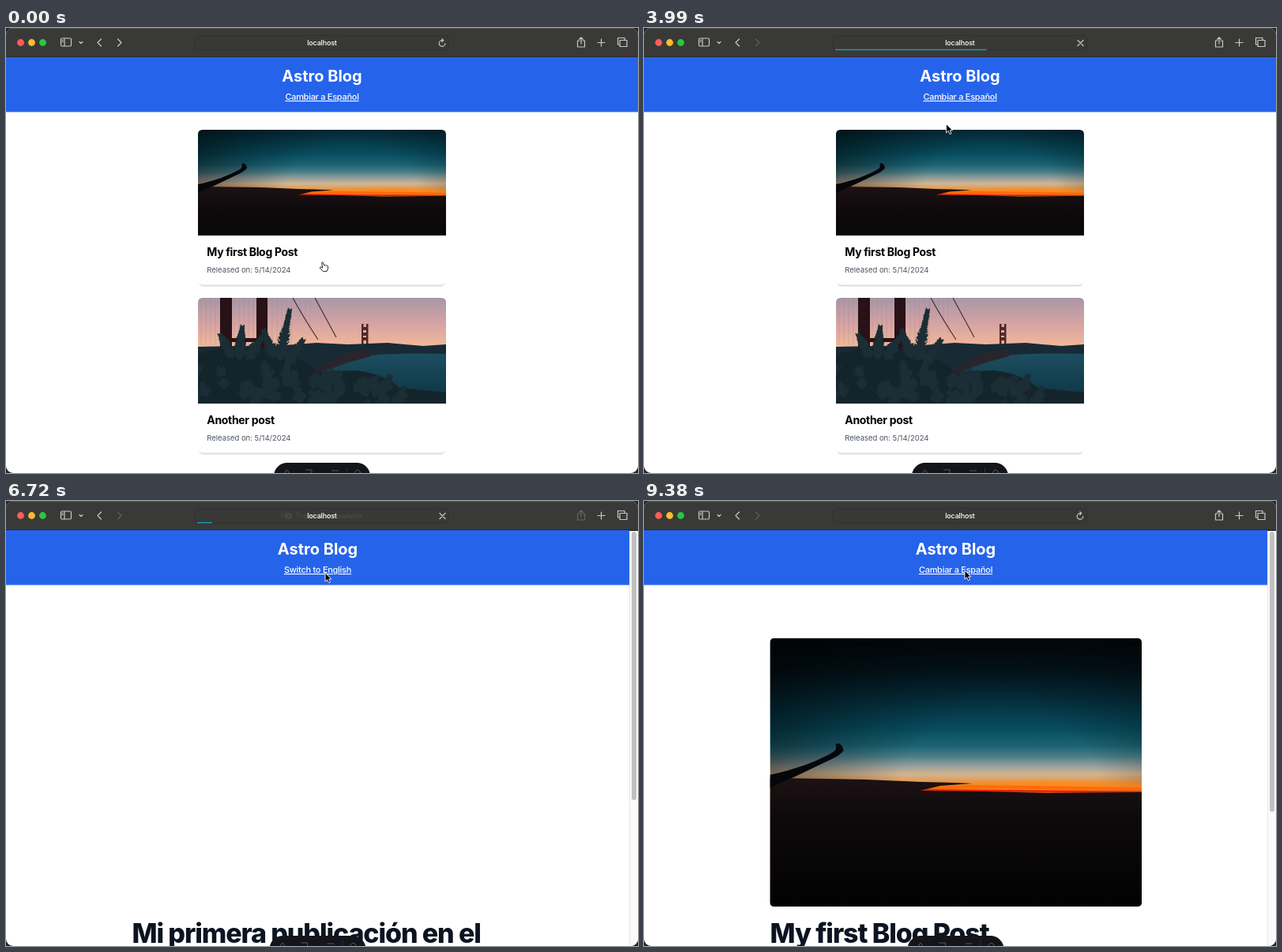
Recreate the animation shown at these times as an HTML page. Size 800 px wide and 564 px high, loop 9450 ms.

```html
<!DOCTYPE html>
<html lang="en">
<head>
<meta charset="utf-8">
<title>Astro Blog</title>
<style>
html, body { margin: 0; width: 100%; height: 100%; overflow: hidden; background: #242424; }
svg { display: block; width: 100vw; height: 100vh; font-family: Inter, "Open Sans", sans-serif; }
.icon { fill: none; stroke: #c9c9c7; stroke-width: 1.2; stroke-linecap: round; stroke-linejoin: round; }
.bar { font-size: 9px; font-weight: 500; letter-spacing: -.18px; fill: #fff; }
.site { font-size: 20px; font-weight: 700; fill: #fff; text-anchor: middle; }
.link { font-size: 11px; font-weight: 500; letter-spacing: -.28px; fill: #fff; text-anchor: middle; text-decoration: underline; }
.head { font-size: 14px; font-weight: 700; letter-spacing: -.33px; fill: #000; }
.date { font-size: 9.5px; letter-spacing: -.02px; fill: #4b5563; }
.title { font-size: 34px; font-weight: 800; letter-spacing: -1.1px; fill: #0b1420; }
</style>
</head>
<body>
<svg viewBox="0 0 800 564">
<defs>
  <linearGradient id="sky" x1="0" y1="0" x2="0" y2="200" gradientUnits="userSpaceOnUse">
    <stop offset="0" stop-color="#01080d"/><stop offset=".2" stop-color="#03151e"/>
    <stop offset=".4" stop-color="#053241"/><stop offset=".58" stop-color="#084e60"/>
    <stop offset=".68" stop-color="#1b6373"/><stop offset=".75" stop-color="#4c7f89"/>
    <stop offset=".81" stop-color="#98a09b"/><stop offset=".86" stop-color="#d0b592"/>
    <stop offset=".91" stop-color="#e39a50"/><stop offset="1" stop-color="#c9560f"/>
  </linearGradient>
  <radialGradient id="glow">
    <stop offset="0" stop-color="#ff8c1a"/><stop offset=".5" stop-color="#ff8a1c" stop-opacity=".7"/>
    <stop offset="1" stop-color="#ff8a1c" stop-opacity="0"/>
  </radialGradient>
  <radialGradient id="vignette" cx=".62" cy=".55" r=".75">
    <stop offset=".35" stop-opacity="0"/><stop offset="1" stop-opacity=".6"/>
  </radialGradient>
  <linearGradient id="ground" x1="0" y1="0" x2="0" y2="1">
    <stop offset="0" stop-color="#1d1113"/><stop offset=".3" stop-color="#0d0a0c"/><stop offset="1" stop-color="#020202"/>
  </linearGradient>
  <linearGradient id="dusk" x1="0" y1="0" x2="0" y2="1">
    <stop offset="0" stop-color="#a897a6"/><stop offset=".5" stop-color="#d3a3a3"/><stop offset="1" stop-color="#f3b899"/>
  </linearGradient>
  <linearGradient id="bay" x1="0" y1="0" x2="0" y2="1">
    <stop offset="0" stop-color="#1d4e60"/><stop offset="1" stop-color="#0b3342"/>
  </linearGradient>
  <g id="sunset">
    <rect width="470" height="340" fill="url(#sky)"/>
    <rect width="470" height="340" fill="url(#vignette)"/>
    <ellipse cx="350" cy="190" rx="230" ry="13" fill="url(#glow)"/>
    <path d="M185 191L250 188L470 191" fill="none" stroke="#ff6a08" stroke-width="4"/>
    <path d="M182 192.500L300 193.500L470 195" fill="none" stroke="#e6280a" stroke-width="3"/>
    <path d="M0 177L120 179L190 182Q235 183 256 184L215 187L190 193L270 194L350 196L470 195V340H0Z" fill="url(#ground)"/>
    <path d="M0 173C30 167 62 155 80 144Q85 141 83 134Q90 131 93 142Q89 148 78 153L28 177Q15 182 0 190Z" fill="#05070a"/>
  </g>
  <g id="bridge">
    <rect width="314" height="62" fill="url(#dusk)"/>
    <path id="wires" fill="none" stroke="#9a7f90" stroke-width=".5" opacity=".55"/>
    <path d="M120 0Q133 24 152 53M148 0L175 50" fill="none" stroke="#3b2932" stroke-width="1.100"/>
    <path d="M207 33h2.500v4h3.500v-4h2.500v28h-2.500v-7h-3.500v7H207ZM209 41h4v3h-4ZM209 48h4v2h-4Z" fill="#51272d" fill-rule="evenodd"/>
    <path d="M0 62L110 60L150 57L190 59L240 57L285 61L314 59V134H0Z" fill="#172a35"/>
    <path d="M165 82Q215 68 314 71V134H120Z" fill="url(#bay)"/>
    <path d="M125 101L192 68L218 65L219 74L190 82L140 100Z" fill="#29252d"/>
    <path d="M28 0H43V78H28ZM74 0H88V78H74ZM40 51H78V56H40Z" fill="#281217"/>
    <path d="M0 72Q40 58 88 66T150 94L200 92Q235 96 255 114L314 120V134H0Z" fill="#14242b"/>
    <path id="leaves" fill="none" stroke="#1b2d35" stroke-width="1.300" stroke-linecap="round"/>
  </g>
  <clipPath id="window"><rect width="800" height="564" rx="9"/></clipPath>
  <clipPath id="cardTop"><path d="M0 134V6Q0 0 6 0H308Q314 0 314 6V134Z"/></clipPath>
  <clipPath id="hero"><rect width="470.500" height="340" rx="5"/></clipPath>
  <g id="card">
    <rect x="1" y="5" width="312" height="193.500" rx="6" fill="#dedede"/>
    <rect y="0" width="314" height="196.500" rx="6" fill="#fff"/>
  </g>
</defs>

<g clip-path="url(#window)">
  <rect width="800" height="564" fill="#fff"/>
  <rect width="800" height="38" fill="#393937"/>
  <path d="M0 .5H800" stroke="#555553"/>
  <path d="M0 36.500H800" stroke="#2a2a29"/>
  <circle cx="18.500" cy="18.500" r="4.400" fill="#ff5f57"/>
  <circle cx="32.500" cy="18.500" r="4.400" fill="#febc2e"/>
  <circle cx="46.500" cy="18.500" r="4.400" fill="#28c840"/>
  <g class="icon">
    <path d="M71 13H81Q82.500 13 82.500 14.500V21.500Q82.500 23 81 23H71Q69.500 23 69.500 21.500V14.500Q69.500 13 71 13ZM74 13V23M71 15.500h1.300M71 17.500h1.300"/>
    <path d="M93 17.500L95 19.500L97 17.500M120.500 14L116 18.500L120.500 23"/>
    <path id="forward" d="M141.500 14L146 18.500L141.500 23"/>
    <path id="share" d="M726 16H723.500V24H732.500V16H730M728 20V12M725.500 14.300L728 11.800L730.500 14.300"/>
    <path d="M749 18.500H758M753.500 14V23"/>
    <path d="M776.500 21H774.500V12.500H783V15M777 15.500H786V23.500H777Z"/>
  </g>
  <rect x="239.500" y="9.500" width="321" height="18.500" rx="5" fill="#383836" stroke="#30302e"/>
  <text id="host" class="bar" x="400" y="22" text-anchor="middle">localhost</text>
  <g id="translate">
    <rect x="348.500" y="13.500" width="7" height="7" rx="3" class="icon"/>
    <rect x="353.500" y="15.500" width="8" height="7" rx="2.500" fill="#eee"/>
    <text x="350.300" y="19" font-size="5" fill="#eee">A</text>
    <path d="M355.500 18H359.500M357.500 17V18M356 21.200L359 18M356 18L359 21.200" fill="none" stroke="#393937" stroke-width=".8"/>
    <text class="bar" x="366" y="22">Translation Available</text>
  </g>
  <path id="reload" class="icon" d="M555.800 19.500A3.800 3.800 0 1 1 552 15.700H553.500M551.800 13.700L553.800 15.700L551.800 17.700"/>
  <path id="stop" class="icon" d="M549 15.500L556 22.500M556 15.500L549 22.500"/>
  <rect id="progress" x="242" y="26.800" height="1.400" fill="#1a9fc0"/>

  <rect id="banner" y="37" height="69.500" fill="#2563eb"/>
  <g id="heading">
    <text class="site" y="68">Astro Blog</text>
    <text id="switch" class="link" y="91"></text>
  </g>

  <g id="home">
    <g transform="translate(243 129)">
      <use href="#card"/>
      <g clip-path="url(#cardTop)"><use href="#sunset" transform="translate(0 -46.500) scale(.668)"/></g>
      <text id="head1" class="head" x="11.300" y="160"></text>
      <text class="date" x="11.300" y="181"></text>
    </g>
    <g transform="translate(243 342)">
      <use href="#card"/>
      <g clip-path="url(#cardTop)"><use href="#bridge"/></g>
      <text id="head2" class="head" x="11.300" y="160"></text>
      <text class="date" x="11.300" y="181"></text>
    </g>
  </g>

  <g id="post">
    <g id="photo" transform="translate(159.500 174)" clip-path="url(#hero)"><use href="#sunset" transform="scale(1.002 1)"/></g>
    <text id="title" class="title" x="159.500" y="560"></text>
    <rect x="789" y="38" width="11" height="526" fill="#fafafa"/>
    <path d="M789.500 38V564" stroke="#e8e8e8"/>
    <rect id="thumb" x="792" y="39" width="6" rx="3" fill="#c1c1c1"/>
  </g>

  <g id="dock">
    <rect x="-61" y="551" width="122" height="36" rx="17" fill="#13151a"/>
    <path d="M-47 564Q-44.500 556-42 564M-21 560h8v4M12 561h9M41 564Q45 556 49 564" fill="none" stroke="#55575d"/>
    <path d="M31.500 557V564" stroke="#2c2f36"/>
  </g>
</g>
<g id="cursor" stroke-linejoin="round">
  <path id="arrow" d="M0 0V11L2.600 8.700L4.500 12.700L6.500 11.800L4.700 7.900H8Z" fill="#000" stroke="#fff" stroke-width=".9"/>
  <path id="hand" transform="scale(.95)" d="M.8 1.300Q1.800 .3 2.700 1.400L3.700 5Q5 4.200 5.700 5.200Q7 4.600 7.600 5.800Q9 5.400 9.200 7L8.800 10L7.500 13H2.500L-1.700 8.700Q-2 7.200-.2 7.300L1.600 8.500Z" fill="#fff" stroke="#000" stroke-width=".9"/>
</g>
</svg>

<script>
const $ = id => document.getElementById(id);
const clamp = v => Math.max(0, Math.min(1, v));
const ease = v => { v = clamp(v); return v * v * (3 - 2 * v); };
const show = (id, v) => $(id).setAttribute('opacity', +v);

const LOOP = 9450, STEP = 70;
const words = {
  en: { link: 'Cambiar a Español', one: 'My first Blog Post', two: 'Another post',
        date: 'Released on: 5/14/2024', title: 'My first Blog Post', thumb: 355 },
  es: { link: 'Switch to English', one: 'Mi primera publicación en el blog', two: 'Otra publicación',
        date: 'Publicado el: 5/14/2024', title: 'Mi primera publicación en el', thumb: 340 }
};
// Each visit: click, load complete, progress bar gone
const visits = [
  { at: -2000, end: -1000, gone: -900, lang: 'en', page: 'home' },
  { at: 1610, end: 2310, gone: 2520, lang: 'es', page: 'home' },
  { at: 3430, end: 4340, gone: 4410, lang: 'en', page: 'home' },
  { at: 4830, end: 5740, gone: 5880, lang: 'en', page: 'post' },
  { at: 6650, end: 7420, gone: 8120, lang: 'es', page: 'post' },
  { at: 8610, end: 9030, gone: 9380, lang: 'en', page: 'post' }
];
const path = [
  [0, 399, 296], [70, 399, 296], [350, 401, 290], [560, 401, 290], [1260, 386, 83],
  [2730, 386, 83], [2800, 387, 83], [2940, 387, 83], [3150, 387, 84], [3780, 387, 84],
  [4410, 370, 230], [4620, 319, 281], [5670, 319, 281], [5880, 370, 190], [6160, 370, 190],
  [6300, 404, 91], [7980, 404, 91], [8120, 406, 89], [8260, 406, 89], [8330, 406, 88], [LOOP, 406, 88]
];
// The pointer starts as a hand and swaps shape at these times
const swaps = [840, 1120, 1680, 2940, 3500, 4200, 4900, 6230, 6720, 8260, 8680];

function pointer(t) {
  const i = path.findIndex(p => p[0] > t);
  const [a, b] = [path[i - 1], path[i]];
  const k = ease((t - a[0]) / (b[0] - a[0]));
  return [a[1] + (b[1] - a[1]) * k, a[2] + (b[2] - a[2]) * k];
}

function drawBridge() {
  let seed = 7, wires = '', leaves = '';
  const rnd = () => (seed = seed * 16807 % 2147483647) / 2147483647;
  for (let x = 4; x < 145; x += 6) wires += `M${x} 0V${x < 120 ? 60 : 2 * (x - 120)}`;
  // A pine frond: needles fan out along a stem that points up
  const frond = (x, y, tilt, len) => {
    const dx = Math.sin(tilt), dy = -Math.cos(tilt);
    for (let s = 0; s < len; s += 1.6) {
      const reach = 3 + 7 * (1 - s / len) * (.5 + rnd());
      for (const side of [-.8, .8]) {
        const a = tilt + side;
        leaves += `M${x + dx * s} ${y + dy * s}l${reach * Math.sin(a)} ${-reach * Math.cos(a)}`;
      }
    }
  };
  for (let i = 0; i < 45; i++) {
    const x = rnd() * 255;
    frond(x, 92 + x * .1 + rnd() * 42, rnd() * 2 - 1, 12 + rnd() * 14);
  }
  frond(103, 80, .2, 66);
  frond(96, 76, -.35, 38);
  frond(112, 84, .6, 38);
  frond(52, 78, .1, 42);
  frond(44, 76, -.5, 34);
  frond(62, 78, .6, 36);
  $('wires').setAttribute('d', wires);
  $('leaves').setAttribute('d', leaves);
}

function render(t) {
  const n = visits.findLastIndex(v => v.at <= t);
  const v = visits[n], age = t - v.at, loading = t < v.end;
  const view = age < STEP ? visits[n - 1] : v;
  const w = words[view.lang], post = view.page === 'post', mid = post ? 394.5 : 400;

  show('home', !post);
  show('post', post);
  show('photo', !(view.lang === 'es' && age < 2 * STEP));
  $('banner').setAttribute('width', post ? 789 : 800);
  $('heading').setAttribute('transform', `translate(${mid} 0)`);
  $('dock').setAttribute('transform', `translate(${mid} 0)`);
  $('switch').textContent = w.link;
  $('head1').textContent = w.one;
  $('head2').textContent = w.two;
  $('title').textContent = w.title;
  document.querySelectorAll('.date').forEach(d => d.textContent = w.date);
  $('thumb').setAttribute('height', w.thumb);

  const changed = n > 0 && visits[n - 1].lang !== v.lang;
  const k = changed ? clamp((age - 50) / 230) : 1;
  const offer = v.lang === 'es' ? k : 1 - k;
  show('translate', offer);
  show('host', 1 - clamp((offer - .45) / .55));
  show('reload', !loading);
  show('stop', loading);
  show('share', post && loading ? .3 : 1);
  show('forward', 1 - .75 * clamp((t - 1610) / 210));

  const grow = ease((age - 140) / (v.end - v.at - 140));
  const start = Math.min(26, age * .27);
  $('progress').setAttribute('width', start + (318 - start) * grow);
  const fade = Math.max(v.end, v.gone - 2 * STEP);
  show('progress', 1 - clamp((t - fade) / (v.gone - fade)));

  const [x, y] = pointer(t);
  const hand = swaps.filter(s => s <= t).length % 2 === 0;
  $('cursor').setAttribute('transform', `translate(${x} ${y})`);
  show('hand', hand);
  show('arrow', !hand);
}

function tick() {
  render(Math.floor(performance.now() % LOOP / STEP) * STEP);
  requestAnimationFrame(tick);
}
drawBridge();
tick();
</script>
</body>
</html>
```
